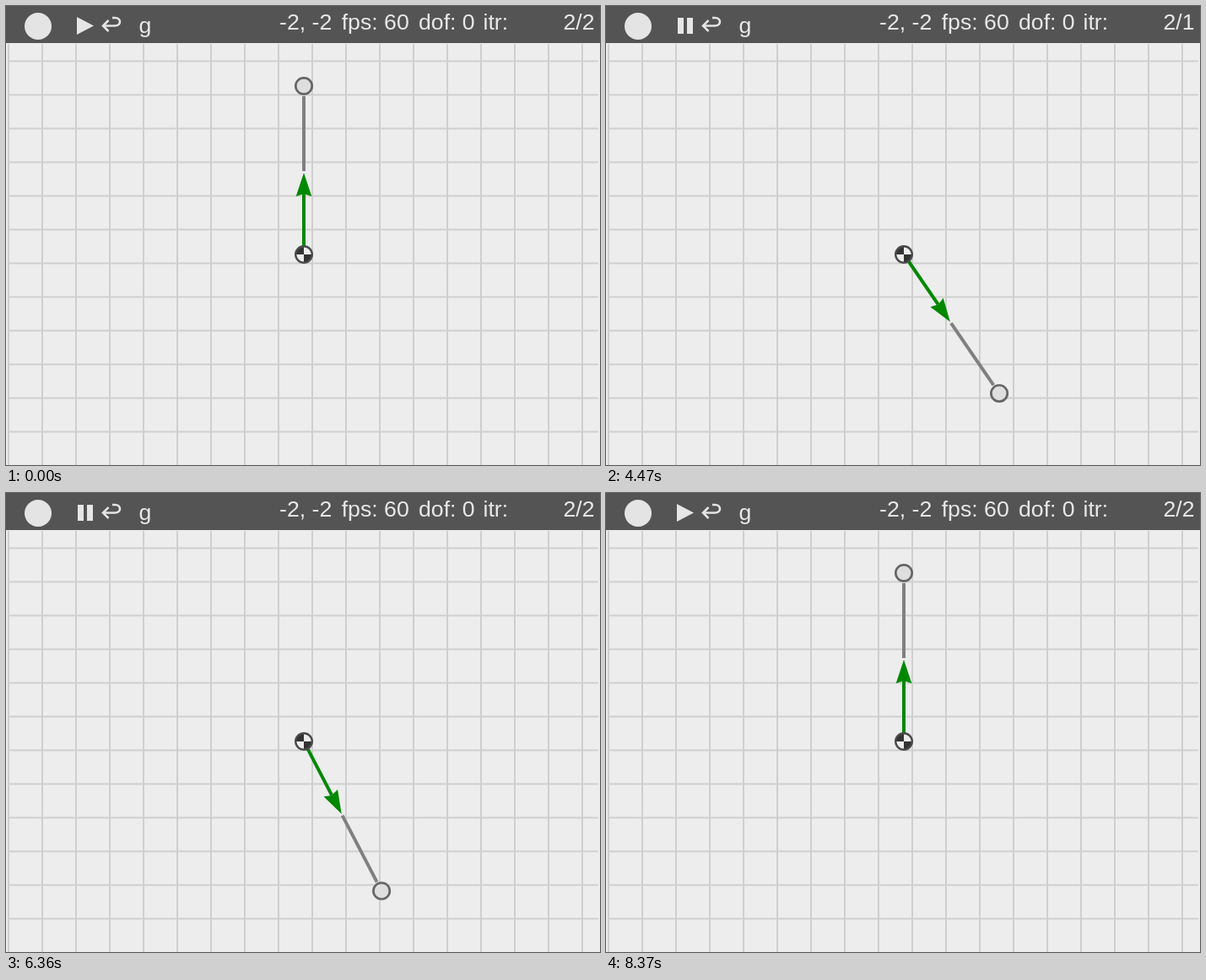
Recreate the animation shown at these times as an HTML page. Size 704 px wide and 545 px high, loop 9480 ms.

```html
<!DOCTYPE html>
<html lang="en">
<head>
<meta charset="utf-8">
<title>Driven arm</title>
<style>
  html, body { margin: 0; width: 100%; height: 100%; overflow: hidden; background: #ededed; }
  svg { display: block; width: 704px; height: 545px; }
  text { font: 26.67px "Liberation Sans", Arial, sans-serif; fill: #e8e8e8; white-space: pre; }
</style>
</head>
<body>
<svg viewBox="0 0 704 545">
  <path id="grid" fill="none" stroke="#cfcfcf" stroke-width="2"/>

  <g transform="translate(353 295)">
    <g id="arm">
      <path d="M0-188V-99" stroke="#808080" stroke-width="4"/>
      <path d="M0-10V-72" stroke="#008800" stroke-width="4"/>
      <path d="M0-97L9.3-69L0-72L-9.3-69Z" fill="#008800"/>
    </g>
    <circle id="tip" r="9.7" fill="#dedede" stroke="#666" stroke-width="2.7"/>
    <circle r="9.8" fill="#eee"/>
    <path d="M0 0H-10A10 10 0 0 1 0-10ZM0 0H10A10 10 0 0 1 0 10Z" fill="#333"/>
    <circle r="9.8" fill="none" stroke="#4a4a4a" stroke-width="2.4"/>
  </g>

  <rect width="704" height="44" fill="#545454"/>
  <circle cx="38" cy="24" r="16" fill="#e4e4e4"/>
  <path id="play" d="M84 13L104 23.5L84 34Z"/>
  <path id="pause" d="M85 14h7v19h-7zM96 14h7v19h-7z"/>
  <path d="M116 23.5H129C137 23.5 137 14 129 14H126M121.5 17L115 23.5L121.5 30"
        fill="none" stroke="#e4e4e4" stroke-width="2.6"/>
  <text x="157.5" y="32">g</text>
  <text x="324" y="28">-2, -2</text>
  <text x="397.7" y="28">fps: 60</text>
  <text x="489" y="28">dof: 0</text>
  <text x="565.5" y="28">itr:</text>
  <text id="iter" x="660.5" y="28">2/2</text>

  <rect id="tooltip" x="112" y="45" width="134" height="45" fill="#fff" stroke="#777" stroke-width="2"/>
  <path id="cursor" d="M0 0V31.5L7 25L11.7 37.3L17.2 35L12.3 23.5H23Z"
        fill="#fff" stroke="#111" stroke-width="1.6"/>
</svg>
<script>
  const LOOP = 9480, STEP = 30;
  const START = 2575, CYCLE = 2880, STOP = START + 2 * CYCLE;
  const FORWARD = 1250, BACK = 1218;
  const $ = id => document.getElementById(id);
  const show = (id, on) => $(id).setAttribute('visibility', on ? 'visible' : 'hidden');

  // time, x, y of the pointer
  const pointer = [
    [960, 80, -40], [1260, 91.8, 8], [1440, 91.8, 8], [1530, 91.8, 12],
    [1650, 91.8, 12], [1680, 91.8, 14], [3210, 91.8, 14], [3420, 91.8, -30], [3480, 91.8, -42]
  ];

  let lines = '';
  for (let x = 3; x < 704; x += 40) lines += `M${x} 45V545`;
  for (let y = 65.5; y < 545; y += 40) lines += `M2 ${y}H702`;
  $('grid').setAttribute('d', lines);

  const quadratic = u => u < 0.5 ? 2 * u * u : 1 - 2 * (1 - u) ** 2;

  // Quadratic swing down, rest, then back up at constant speed.
  function angle(t) {
    if (t < START || t >= STOP) return 0;
    const s = (t - START) % CYCLE;
    if (s < FORWARD) return 180 * quadratic(s / FORWARD);
    return 180 * Math.min(1, (CYCLE - s) / BACK);
  }

  function iterations(t) {
    if (t < START || t >= STOP) return '2/2';
    const s = (t - START) % CYCLE;
    const jump = s >= 1655 && s < 1685;
    return s < 1295 || jump ? '2/2' : '2/1';
  }

  function pointerAt(t) {
    const i = pointer.findIndex(p => p[0] > t);
    if (i < 1) return [0, -60];
    const [t0, x0, y0] = pointer[i - 1], [t1, x1, y1] = pointer[i];
    const u = (t - t0) / (t1 - t0);
    return [x0 + (x1 - x0) * u, y0 + (y1 - y0) * u];
  }

  function draw(t) {
    const a = angle(t), rad = a * Math.PI / 180;
    $('arm').setAttribute('transform', `rotate(${a})`);
    $('tip').setAttribute('cx', 200 * Math.sin(rad));
    $('tip').setAttribute('cy', -200 * Math.cos(rad));

    const running = t >= 2610 && t < 8370;
    const [x, y] = pointerAt(t);
    for (const id of ['play', 'pause']) {
      show(id, (id === 'pause') === running);
      $(id).setAttribute('fill', y > 10 ? '#fff' : '#e6e6e6');
    }
    $('cursor').setAttribute('transform', `translate(${x} ${y})`);
    show('tooltip', t >= 2040 && t < 2460);
    $('iter').textContent = iterations(t);
  }

  const origin = performance.now();
  function tick() {
    const t = (performance.now() - origin) % LOOP;
    draw(Math.floor(t / STEP) * STEP);
    requestAnimationFrame(tick);
  }
  tick();
</script>
</body>
</html>
```
